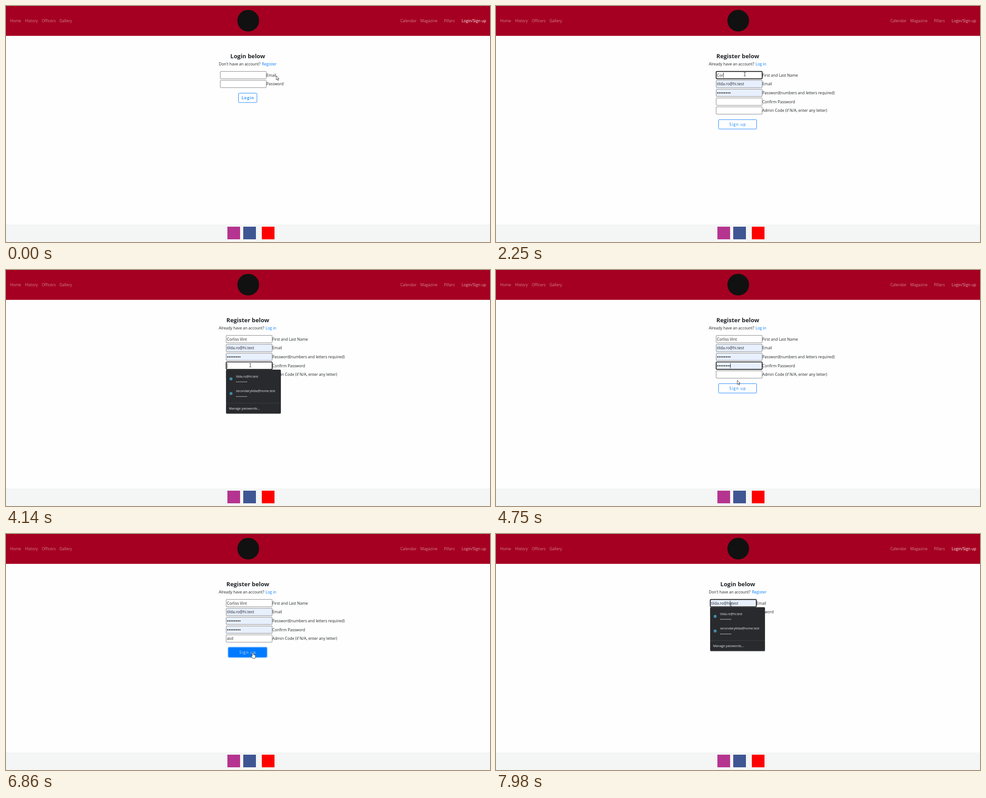
Write an HTML page that moves like this. It is 1069 px wide and 524 px high and loops after 8000 ms.

```html
<!DOCTYPE html>
<html lang="en">
<head>
<meta charset="utf-8">
<title>Sign-up walkthrough</title>
<style>
  html, body { margin: 0; width: 100%; height: 100%; overflow: hidden; background: #fefefe; }
  svg { display: block; width: 100vw; height: 100vh; }
  text { font: 8.5px "Open Sans", "Noto Sans", sans-serif; fill: #212529; white-space: pre; }
  .nav { fill: #fff; fill-opacity: .52; }
  .title { font-size: 12.9px; font-weight: 700; }
  .link { fill: #007bff; }
  .link.hover { fill: #0056b3; text-decoration: underline; }
  .button { letter-spacing: 1.12px; fill: #007bff; }
  .button.hover { fill: #d5dcea; }
  .menu { font-size: 6.95px; fill: #e8eaed; }
</style>
</head>
<body>
<svg viewBox="0 0 1069 524">
  <rect width="1069" height="66.3" fill="#a50021"/>
  <rect y="485" width="1069" height="39" fill="#f4f5f5"/>
  <circle cx="535" cy="32.5" r="24" fill="#111"/>
  <rect x="489" y="490" width="28" height="28" fill="#b5348f"/>
  <rect x="524" y="490" width="28" height="28" fill="#3f5693"/>
  <rect x="565" y="490" width="28" height="28" fill="#f00"/>
  <g id="view"></g>
</svg>
<script>
const LOOP = 8000;
const FONT = '8.5px "Open Sans", "Noto Sans", sans-serif';
const FULL_NAME = "Corliss Vint";
const EMAIL = "tilda.ro@hi.test";
const OTHER_EMAIL = "secondarytilda@home.test";
const AUTOFILL = "#e8f0fe";

// Moments at which each key lands
const NAME_KEYS = [1770, 2000, 2250, 2370, 2500, 2620, 2750, 2870, 3000, 3140, 3390, 3530];
const CODE_KEYS = [5500, 5640, 5760];

// Pointer stops: time, shape, x, y
const POINTER = [
  [0, "arrow", 597, 155], [120, "hand", 586, 128], [510, "hand", 584, 130],
  [630, "arrow", 572, 137], [760, "beam", 559, 149], [880, "beam", 551, 151],
  [1010, "beam", 549.5, 151.5],
  [3760, "beam", 547, 169], [3890, "beam", 541, 205], [4010, "beam", 539.5, 211.5],
  [4250, "arrow", 538, 226], [4370, "arrow", 537, 237], [4500, "arrow", 537, 241],
  [4750, "arrow", 533, 245], [4880, "beam", 533, 236],
  [5130, "beam", 532, 233], [5640, "arrow", 531, 243], [5760, "hand", 529, 263],
  [5880, "hand", 528.5, 272.5], [6010, "hand", 529, 271], [6120, "hand", 530, 269.5],
  [6370, "hand", 530.5, 269], [6510, "hand", 536, 267], [6630, "hand", 542, 264],
  [6750, "hand", 545, 263], [7230, "arrow", 545, 259], [7360, "arrow", 544, 239],
  [7500, "hand", 533, 205], [7610, "beam", 524, 172], [7760, "beam", 520, 158],
  [7880, "beam", 519, 157]
];

const SHAPES = {
  arrow: '<path d="M0 0V9L2.1 7.1 3.6 10.4 5 9.8 3.5 6.6H6.2Z" fill="#fff" stroke="#222" stroke-width=".8"/>',
  hand: '<path d="M-1.2 .9Q0-.6 1.2 .9V5Q2.3 4.2 3 5.4Q4.2 4.8 4.6 5.9Q6 5.6 6 7V9.5Q6 11 5 13H-.2Q-1.5 10.5-3.6 8.3Q-4.2 6.9-2.9 6.9L-1.2 8.2Z" fill="#fff" stroke="#222" stroke-width=".8"/>',
  beam: '<path d="M-2-4H-.5L0-3.5 .5-4H2M0-3.5V3.5M-2 4H-.5L0 3.5 .5 4H2" fill="none" stroke="#222" stroke-width=".9"/>'
};

const pen = document.createElement("canvas").getContext("2d");
const view = document.getElementById("view");

const within = (t, from, to) => t >= from && t < to;
const typed = (word, keys, t) => word.slice(0, keys.filter(k => k <= t).length);
const rowY = i => 153.5 + 19.65 * i;

function textWidth(s) {
  pen.font = FONT;
  return pen.measureText(s).width;
}

function text(x, y, s, cls = "", extra = "") {
  return `<text x="${x}" y="${y}" class="${cls}" ${extra}>${s}</text>`;
}

function rect(x, y, w, h, attrs) {
  return `<rect x="${x}" y="${y}" width="${w}" height="${h}" ${attrs}/>`;
}

function dots(x, y, gap, size, color) {
  return `<path d="M${x} ${y}h${gap * 7 + .1}" fill="none" stroke="${color}" stroke-width="${size}"
    stroke-linecap="round" stroke-dasharray="0 ${gap}"/>`;
}

function field(x, row, label, { value = "", secret, filled, focus, caret } = {}) {
  const y = rowY(row);
  const border = focus ? 'stroke="#101010" stroke-width="1.7" rx="1.5"' : 'stroke="#767676" stroke-width=".9" rx="1"';
  let out = rect(x + .3, y - 8.2, 101.6, 16.3, `fill="${filled ? AUTOFILL : "#fff"}" ${border}`);
  out += secret ? dots(x + 3.6, y + .2, 3.85, 2.5, "#111") : text(x + 1.9, y + 3.1, value);
  if (caret) out += rect(caret, y - 5.7, .8, 11.5, 'fill="#111"');
  return out + text(x + 102, y + 3.1, label);
}

function button(x, y, w, h, label, hover, focus, weight = 400) {
  const ring = focus ? rect(x - 1, y - 1, w + 2, h + 2, 'rx="2.5" fill="none" stroke="#80bdff" stroke-width="1.8"') : "";
  return ring +
    rect(x, y, w, h, `rx="1.8" fill="${hover ? "#007bff" : "#fefefe"}" stroke="#007bff" stroke-width=".9"`) +
    text(x + w / 2 + .5, y + h / 2 + 3.1, label, hover ? "button hover" : "button", `text-anchor="middle" font-weight="${weight}" style="font-weight:${weight}"`);
}

function menu(x, row, hover) {
  const y = rowY(row) + 8.9;
  const account = (top, email) =>
    `<circle cx="${x + 11}" cy="${top + 20.5}" r="3.3" fill="#3d8ca5"/>` +
    text(x + 22, top + 17.3, email, "menu") +
    dots(x + 23.3, top + 27, 3.15, 1.8, "#e8eaed");
  return rect(x - .3, y + .5, 121.8, 98, 'rx="2" fill="#000" opacity=".22"') +
    rect(x, y, 121, 97.3, 'rx="2" fill="#292a2d"') +
    (hover ? rect(x, y + 4.5, 121, 32, 'fill="#3f4042"') : "") +
    account(y, EMAIL) + account(y + 32.5, OTHER_EMAIL) +
    rect(x, y + 74, 121, .7, 'fill="#48494c"') +
    text(x + 6.5, y + 88.2, "Manage passwords...", "menu");
}

function nav(login) {
  const items = [["Home", 9, 36], ["History", 42, 36], ["Officers", 79, 36], ["Gallery", 118, 36],
    ["Calendar", 871, 35.5], ["Magazine", 915, 35.5], ["Pillars", 967.5, 36]];
  return items.map(([s, x, y]) => text(x, y, s, "nav")).join("") +
    text(1060.5, 35.5, "Login/Sign up", "nav", `text-anchor="end" style="fill-opacity:${login ? 1 : .65}"`);
}

function heading(title, question, link, linkX, hover) {
  return text(534, 115.7, title, "title", 'text-anchor="middle"') +
    text(470, 132.4, question) +
    text(linkX, 132.4, link, hover ? "link hover" : "link");
}

function loginPage(t) {
  const filled = t > 4000;
  const focus = t >= 7760;
  return heading("Login below", "Don't have an account?", "Register", 565.3, within(t, 120, 370)) +
    field(473, 0, "Email", { value: filled ? EMAIL : "", filled, focus, caret: focus && 516.6 }) +
    field(473, 1, "Password", { secret: filled, filled }) +
    button(513.5, 193.5, 40.7, 20.8, "Login", within(t, 7500, 7610), false, 600) +
    (focus ? menu(473, 0, false) : "");
}

function registerPage(t) {
  const x = 486;
  const name = typed(FULL_NAME, NAME_KEYS, t);
  const code = typed("asd", CODE_KEYS, t);
  const after = s => x + 2.1 + textWidth(s);
  const nameFocus = within(t, 1010, 4010);
  const confirmFocus = within(t, 4010, 5130);
  const codeFocus = within(t, 5130, 6750);
  const confirmed = t >= 4370;
  const preview = within(t, 4370, 4640);
  return heading("Register below", "Already have an account?", "Log in", 573.3, t < 630) +
    field(x, 0, "First and Last Name", {
      value: name, focus: nameFocus,
      caret: nameFocus && !within(t, 1500, 1770) && after(name)
    }) +
    field(x, 1, "Email", { value: EMAIL, filled: true }) +
    field(x, 2, "Password(numbers and letters required)", { secret: true, filled: true }) +
    field(x, 3, "Confirm Password", {
      secret: confirmed, filled: confirmed, focus: confirmFocus,
      caret: confirmFocus && !preview && (confirmed ? 517.4 : 488)
    }) +
    field(x, 4, "Admin Code (if N/A, enter any letter)", {
      value: code, focus: codeFocus, caret: codeFocus && t < 6370 && after(code)
    }) +
    button(491.6, 252.3, 84, 20.8, "Sign up", t >= 5760, t >= 6750) +
    (within(t, 4010, 4640) ? menu(x, 3, preview) : "");
}

function pointer(t) {
  const [, shape, x, y] = POINTER.filter(stop => stop[0] <= t).pop();
  return `<g transform="translate(${x} ${y})">${SHAPES[shape]}</g>`;
}

let shown = "";
function draw() {
  const t = performance.now() % LOOP;
  const registering = within(t, 370, 7110);
  const next = nav(!registering) + (registering ? registerPage(t) : loginPage(t)) + pointer(t);
  if (next !== shown) view.innerHTML = shown = next;
  requestAnimationFrame(draw);
}
draw();
</script>
</body>
</html>
```
